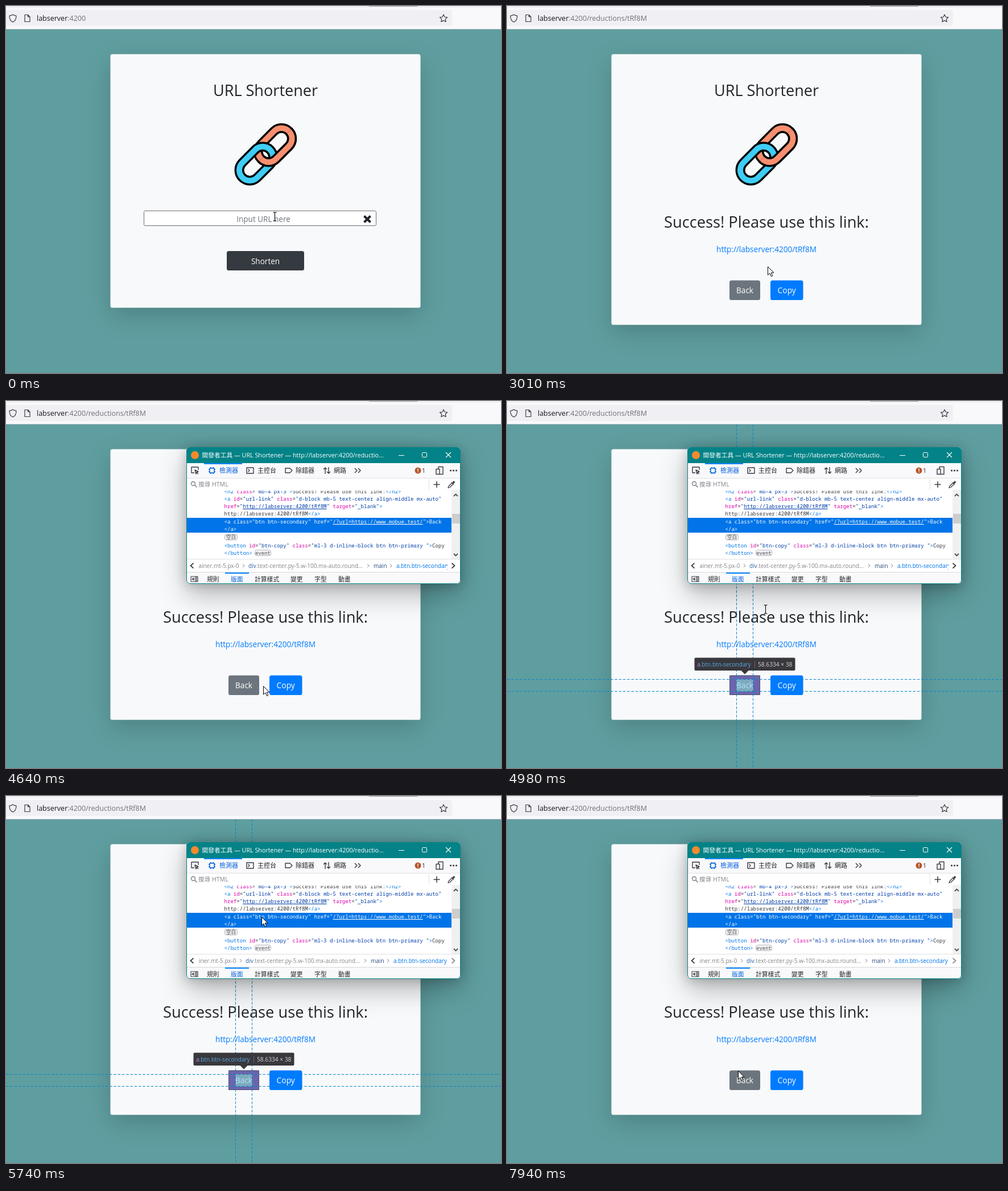
An HTML page with a canvas for the animation above (8000 ms loop, 870 by 644 pixels).

```html
<!DOCTYPE html>
<html lang="en">
<head>
<meta charset="utf-8">
<title>URL Shortener</title>
<style>
html, body { margin: 0; width: 100%; height: 100%; overflow: hidden; background: #5f9ea0; }
canvas { display: block; width: 870px; height: 644px; }
</style>
</head>
<body>
<canvas id="stage" width="870" height="644"></canvas>
<script>
const ctx = document.getElementById('stage').getContext('2d');
const LOOP = 8000;
const SANS = '"Open Sans","Noto Sans CJK TC","Noto Sans CJK JP",sans-serif';
const MONO = '"Noto Sans Mono","DejaVu Sans Mono",monospace';
const INK = '#212529', BLUE = '#007bff', GREY = '#3a3a44', ACTIVE = '#0060df', TEAL = '#038387';
const HOST = 'labserver:4200', CODE = 'tRf8M';
const SHORT = `http://${HOST}/${CODE}`, LONG = 'https://www.mobue.test/';

// ---------- helpers ----------
function text(s, x, y, size, color = INK, align = 'left', family = SANS) {
  ctx.font = `${size}px ${family}`;
  ctx.fillStyle = color;
  ctx.textAlign = align;
  ctx.fillText(s, x, y);
  return ctx.measureText(s).width;
}

function rect(x, y, w, h, color) {
  ctx.fillStyle = color;
  ctx.fillRect(x, y, w, h);
}

function box(x, y, w, h, r, fill, stroke, lw = 1) {
  ctx.beginPath();
  ctx.roundRect(x, y, w, h, r);
  if (fill) { ctx.fillStyle = fill; ctx.fill(); }
  if (stroke) { ctx.strokeStyle = stroke; ctx.lineWidth = lw; ctx.stroke(); }
}

function icon(d, x, y, stroke, lw = 1.2, fill) {
  const p = new Path2D(d);
  ctx.save();
  ctx.translate(x, y);
  ctx.lineJoin = 'round';
  if (fill) { ctx.fillStyle = fill; ctx.fill(p); }
  if (stroke) { ctx.strokeStyle = stroke; ctx.lineWidth = lw; ctx.stroke(p); }
  ctx.restore();
}

function dot(x, y, r, color) {
  ctx.beginPath();
  ctx.arc(x, y, r, 0, Math.PI * 2);
  ctx.fillStyle = color;
  ctx.fill();
}

function shadow(color, blur, dy, draw) {
  ctx.save();
  ctx.shadowColor = color;
  ctx.shadowBlur = blur;
  ctx.shadowOffsetY = dy;
  draw();
  ctx.restore();
}

function clip(x, y, w, h, draw) {
  ctx.save();
  ctx.beginPath();
  ctx.rect(x, y, w, h);
  ctx.clip();
  draw();
  ctx.restore();
}

const during = (t, a, b) => t >= a && t < b;

// ---------- browser ----------
function star(r1, r2) {
  let d = '';
  for (let i = 0; i < 10; i++) {
    const a = i * Math.PI / 5 - Math.PI / 2, r = i % 2 ? r2 : r1;
    d += `${i ? 'L' : 'M'}${(r * Math.cos(a)).toFixed(2)} ${(r * Math.sin(a)).toFixed(2)}`;
  }
  return d + 'Z';
}
const STAR = star(7, 3.4);

function browser(success) {
  rect(0, 0, 870, 41, '#f9f9fb');
  rect(0, 0, 870, 3, '#f0f0f4');
  rect(638, 0, 85, 1, '#98989e');
  box(-8, 7, 792, 28, 4, '#f0f0f4');
  rect(0, 40, 870, 1, '#d0d0d6');
  icon('M0-6.5Q3-4.3 6-4.3Q6 4 0 6.8Q-6 4-6-4.3Q-3-4.3 0-6.5Z', 12, 21.5, GREY);
  icon('M-4.5-6H1L4.5-2.5V6H-4.5ZM1-6V-2.5H4.5', 37.5, 21.5, GREY);
  icon(STAR, 769, 22, GREY);
  const w = text('labserver', 54, 26, 12.5, '#15141a');
  text(':4200' + (success ? `/reductions/${CODE}` : ''), 54 + w, 26, 12.5, '#6f6f78');
}

// ---------- page ----------
function link(x, y, color) {
  ctx.save();
  ctx.translate(x, y);
  ctx.rotate(-Math.PI / 4);
  for (const [lw, c] of [[17, '#000'], [10, color]]) box(-18.5, -18.5, 69, 37, 18.5, null, c, lw);
  ctx.restore();
}

function chain() {
  const orange = () => link(461.5, 255.5, '#f78f6f');
  orange();
  link(428.5, 288, '#3fcdf5');
  // the lower right crossing goes over
  ctx.save();
  ctx.beginPath();
  ctx.moveTo(517, 200);
  ctx.lineTo(517, 320);
  ctx.lineTo(397, 320);
  ctx.clip();
  orange();
  ctx.restore();
}

function card(h) {
  rect(0, 41, 870, 603, '#5f9ea0');
  clip(0, 41, 870, 603, () =>
    shadow('rgba(0,0,0,.175)', 43.7, 14.6, () => box(183.5, 84.5, 545, h, 3.6, '#f8f9fb')));
  text('URL Shortener', 456, 158, 27.1, INK, 'center');
  chain();
}

function formPage(t) {
  card(445);
  const focus = t < 530 || t >= 2940 ? 0 : t < 610 ? .5 : 1;
  box(242.5, 359.5, 408, 26, 2, '#fff', '#6f6f78');
  if (focus) {
    ctx.globalAlpha = focus;
    box(239.5, 355.5, 414, 33, 4, '#e6f1fc', '#94c3f0');
    box(243, 359, 408, 27, 2, '#fff', ACTIVE, 2);
    ctx.globalAlpha = 1;
  }
  if (t < 1300) text('Input URL here', 452.5, 379, 13.55, '#6c757d', 'center');
  else text(LONG, 440.5, 379, 13.55, '#000', 'center');
  if (during(t, 530, 1070)) rect(440, 363, 1, 19, '#000');
  if (during(t, 1300, 1620) || during(t, 2160, 2680)) rect(522, 363, 1, 19, '#000');
  icon('M-5.5-5.5L5.5 5.5M5.5-5.5L-5.5 5.5', 635, 374, INK, 4);

  if (t >= 2940) box(386.5, 428.5, 139, 37, 5, null, 'rgba(82,88,93,.5)', 3);
  box(388, 430, 136, 34, 3.6, t < 2080 ? '#343a40' : t < 2160 ? '#2b3035' : '#23272b');
  text('Shorten', 456, 453, 13.55, '#fff', 'center');
}

function successPage(t) {
  card(475);
  text('Success! Please use this link:', 456, 388.5, 27.25, INK, 'center');
  text(SHORT, 456, 432, 13.55, BLUE, 'center');
  const hover = during(t, 3830, 4240);
  if (during(t, 3970, 4310)) box(389.8, 480.2, 56.4, 37.2, 5, null, 'rgba(130,138,145,.5)', 3);
  box(391, 481.5, 54, 34.5, 3.6, hover ? '#5a6268' : '#6c757d');
  text('Back', 418, 504, 13.6, '#fff', 'center');
  box(463, 481.5, 57.5, 34.5, 3.6, BLUE);
  text('Copy', 491.7, 504, 13.8, '#fff', 'center');
}

function highlight() {
  rect(391, 481.5, 54, 34.5, 'rgba(106,90,205,.6)');
  rect(403, 488, 30, 22, '#6c757d');
  text('Back', 418, 504, 13.6, '#fff', 'center');
  rect(403, 488, 30, 22, 'rgba(135,206,235,.6)');
  ctx.strokeStyle = 'rgba(68,68,68,.6)';
  ctx.lineWidth = 1;
  ctx.strokeRect(391.5, 482, 53, 33.5);

  ctx.save();
  ctx.setLineDash([4.55, 2.73]);
  ctx.strokeStyle = '#0a86c6';
  ctx.beginPath();
  for (const x of [403.5, 432.5]) { ctx.moveTo(x, 41); ctx.lineTo(x, 644); }
  for (const y of [488.5, 509.5]) { ctx.moveTo(0, y); ctx.lineTo(870, y); }
  ctx.stroke();
  ctx.restore();

  box(329.5, 450.5, 177, 22.5, 2, '#38383d');
  icon('M-7 0H7L0 7Z', 418, 472.5, null, 0, '#38383d');
  const w = text('a', 334, 465.5, 10.1, '#c58af0');
  text('.btn.btn-secondary', 334 + w, 465.5, 10.1, '#5aa9e0');
  rect(435, 456, 1, 12, '#66666d');
  text('58.6334 × 38', 441, 465.5, 10.2, '#d7d7db');
}

// ---------- inspector window ----------
const TOKEN = /<\/?\w+|>|[\w-]+(?==)|"[^"]*"|[=\s]+|[^<>="]+/g;

function markup(src, y, white) {
  let x = 383.5;
  for (const m of src.matchAll(TOKEN)) {
    const s = m[0], next = src[m.index + s.length];
    const color = white ? '#fff'
      : /^[<>]/.test(s) ? '#0074e8'
      : s[0] === '"' ? '#003eaa'
      : next === '=' ? '#dd00a9' : '#38383d';
    const w = text(s, x, y, 9.1, color, 'left', MONO);
    if (s[0] === '"' && s.includes('/')) {
      const ch = w / s.length;
      rect(x + ch, y + 1, w - 2 * ch, 1, color);
    }
    x += w;
  }
}

function badge(s, x, y, w, family) {
  box(x + .5, y + .5, w, 10, 3, '#f4f4f6', '#b8b8c0');
  text(s, x + w / 2 + .5, y + 8.8, 8.8, '#4a4a4f', 'center', family);
}

function crumbs(late) {
  const d = late ? -5 : 0, y = 292.5;
  clip(338, 278, 438, 22, () => {
    text('container.mt-5.px-0', 409.5 + d, y, 10, '#85858d', 'right');
    for (const x of [417.5, 636.5, 676.5]) icon('M-1.5-3L1.5 0L-1.5 3', x + d, 289, '#85858d', 1);
    const w = text('div', 426 + d, y, 10, '#2a5d9c');
    text('.text-center.py-5.w-100.mx-auto.round...', 426 + d + w, y, 10, '#85858d');
    text('main', 646 + d, y, 10, '#2a4a7c');
    text('a.btn.btn-secondary', 686 + d, y, 10, '#0074e8');
  });
  icon('M2.5-4.5L-2.5 0L2.5 4.5', 327, 289, '#15141a', 1.6);
  icon('M-2.5-4.5L2.5 0L-2.5 4.5', 786, 289, late ? '#777780' : '#15141a', 1.6);
}

function toolbar() {
  rect(317, 109, 482, 27, '#f9f9fb');
  rect(317, 135, 482, 1, '#e0e0e2');
  rect(348, 109, 67, 2, '#0a84ff');
  icon('M-1 4H-6V-6H6V-1M0-1L6 2L3 3L2 6ZM3 3L6 6', 332, 122, GREY, 1.4);
  icon('M-4-4H4V4H-4ZM-2-6V-4M2-6V-4M-2 4V6M2 4V6M-6-2H-4M-6 2H-4M4-2H6M4 2H6', 362, 122, ACTIVE, 1.4);
  icon('M-6-5H6V5H-6ZM-3.5-2.5L-1 0L-3.5 2.5', 429, 122, GREY, 1.4);
  icon('M-6-4H2L6 0L2 4H-6Z', 497, 122, GREY, 1.4);
  icon('M-3 6V-5M-6-2L-3-5L0-2M3-6V5M0 2L3 5L6 2', 564, 122, GREY, 1.4);
  icon('M-5-4L-1 0L-5 4M1-4L5 0L1 4', 618, 122, GREY, 1.5);
  text('檢測器', 375, 126, 11, ACTIVE);
  text('主控台', 442, 126, 11);
  text('除錯器', 509, 126, 11);
  text('網路', 576, 126, 11);
  dot(724, 122, 5.5, '#b5562a');
  rect(723.3, 118.5, 1.4, 4.5, '#fff');
  rect(723.3, 124, 1.4, 1.4, '#fff');
  text('1', 731, 126, 10.5);
  icon('M-2-3V-7H6V6H0M-6-3H0V6H-6Z', 762, 122.5, GREY, 1.4);
  for (const x of [781.5, 786.5, 791.5]) dot(x, 122, 1.6, GREY);

  rect(317, 136, 482, 20, '#fff');
  ctx.beginPath();
  ctx.arc(329, 145, 3.5, 0, Math.PI * 2);
  ctx.strokeStyle = '#777780';
  ctx.lineWidth = 1.3;
  ctx.stroke();
  icon('M0 0L4 4', 331.5, 147.5, '#777780', 1.5);
  text('搜尋 HTML', 338, 150, 10.6, '#85858d');
  rect(743, 137, 1, 18, '#e0e0e2');
  icon('M-5.5 0H5.5M0-5.5V5.5', 757, 146.5, GREY, 1.5);
  icon('M-6 6L-5 3L1-3L3-1L-3 5ZM0-4L4 0', 783, 146.5, GREY, 1.2);
  icon('M1-2L4-6L6-4L2-1Z', 783, 146.5, GREY, 1, GREY);
}

function code() {
  rect(317, 156, 482, 121, '#fff');
  clip(317, 157.5, 466, 119, () => {
    markup('<h2 class="mb-4 px-3">Success! Please use this link:</h2>', 161.5);
    markup('<a id="url-link" class="d-block mb-5 text-center align-middle mx-auto"', 175);
    markup(`href="${SHORT}" target="_blank">`, 188);
    markup(`${SHORT}</a>`, 201);
    rect(317, 205, 466, 26, '#0074e8');
    markup(`<a class="btn btn-secondary" href="/?url=${LONG}">Back`, 215, true);
    markup('</a>', 228, true);
    badge('空白', 384, 233.5, 22, SANS);
    markup('<button id="btn-copy" class="ml-3 d-inline-block btn btn-primary ">Copy', 257);
    markup('</button>', 270);
    badge('event', 437, 261, 28, MONO);
  });
  rect(783, 156, 16, 121, '#f0f0f0');
  rect(784, 198, 14, 17, '#cdcdcd');
  icon('M-3.5 2L0-1.5L3.5 2', 790.5, 165, '#505050', 1.8);
  icon('M-3.5-2L0 1.5L3.5-2', 790.5, 270, '#505050', 1.8);
}

function inspector(late) {
  const pane = () => box(317, 81, 482, 240, 7, '#f9f9fb');
  shadow('rgba(0,0,0,.28)', 48, 18, pane);
  shadow('rgba(0,0,0,.2)', 20, 2, pane);
  ctx.save();
  ctx.beginPath();
  ctx.roundRect(317, 81, 482, 240, 7);
  ctx.clip();
  rect(317, 81, 482, 28, TEAL);
  dot(332, 95, 7, '#f58a2c');
  text(`開發者工具 — URL Shortener — http://${HOST}/reductio...`, 344.5, 99, 10.75, '#fff');
  rect(690, 95, 10, 1, '#fff');
  box(731.5, 90.5, 8, 8, 1, null, '#fff');
  icon('M-4.5-4.5L4.5 4.5M4.5-4.5L-4.5 4.5', 777.5, 94.5, '#fff', 1.1);
  toolbar();
  code();
  rect(317, 277, 482, 24, '#fff');
  rect(317, 277, 482, 1, '#e0e0e2');
  crumbs(late);
  rect(317, 300, 482, 21, '#f9f9fb');
  rect(317, 300, 482, 1, '#d7d7db');
  rect(385, 301, 42, 2, '#0a84ff');
  icon('M-6-4.5H6V4.5H-6ZM2-4.5V4.5M4-4.5V4.5M-1-2L-4 0L-1 2Z', 331, 312.5, GREY, 1.1);
  const tabs = [['規則', 353], ['版面', 395], ['計算樣式', 437], ['變更', 500], ['字型', 542], ['動畫', 584]];
  for (const [s, x] of tabs) text(s, x, 317, 10.8, s === '版面' ? ACTIVE : INK);
  ctx.restore();
  box(317.5, 81.5, 481, 239, 6.5, null, TEAL);
}

// ---------- pointer ----------
const SHAPES = {
  beam(x, y) {
    const d = 'M-3-7.5H-1L0-6.5L1-7.5H3M0-6.5V6.5M-3 7.5H-1L0 6.5L1 7.5H3';
    icon(d, x + .5, y + .5, 'rgba(255,255,255,.6)', 2.4);
    icon(d, x + .5, y + .5, '#000', 1.1);
  },
  arrow: (x, y) =>
    icon('M0 0V14.5L3.4 11.4L5.8 17L8.2 16L5.8 10.5H10.5Z', x + .5, y + .5, '#000', 1, '#fff'),
  hand: (x, y) =>
    icon('M-1.5 0Q0-1.5 1.5 0V6Q3 4.8 4.2 6.5Q6 5.7 6.8 7.4Q9 7 9.3 9.5V13Q9 16 7.5 17.5V19.5H-1.5V18' +
      'Q-4 15-6 11.5Q-5.5 9-3 10.5L-1.5 12ZM1.5 6V10M4.2 6.5V10.5M6.8 7.4V11', x, y, '#000', 1.1, '#fff')
};

// [first step, last step, steps, x, y]
const MOVES = [
  [70, 150, 2, 464, 376], [1920, 2160, 4, 458, 457], [3480, 3900, 7, 420, 508],
  [4100, 4240, 3, 452, 500], [4660, 4980, 5, 454, 365], [5120, 5740, 10, 449, 212],
  [5950, 6300, 6, 738, 213], [6370, 6710, 5, 425, 220], [6780, 7120, 5, 390, 220],
  [7590, 7940, 6, 406, 482]
];
const KINDS = [
  [0, 'beam'], [2080, 'arrow'], [2310, 'hand'], [3010, 'arrow'], [3830, 'hand'],
  [4170, 'arrow'], [4980, 'beam'], [5190, 'arrow']
];

function pointer(t) {
  let x = 472, y = 369;
  for (const [a, b, n, tx, ty] of MOVES) {
    if (t < a) break;
    const k = Math.min(1, (Math.floor((t - a) / (b - a) * (n - 1) + 1e-6) + 1) / n);
    x += (tx - x) * k;
    y += (ty - y) * k;
  }
  const kind = KINDS.findLast(([at]) => t >= at)[1];
  SHAPES[kind](Math.round(x), Math.round(y));
}

// ---------- loop ----------
function draw(t) {
  const success = t >= 3010;
  if (success) successPage(t); else formPage(t);
  browser(success);
  if (during(t, 4660, 5260) || during(t, 5600, 7730)) highlight();
  if (t >= 4380) inspector(t >= 5260);
  pointer(t);
}

const start = performance.now();
function frame() {
  draw((performance.now() - start) % LOOP);
  requestAnimationFrame(frame);
}
frame();
</script>
</body>
</html>
```
